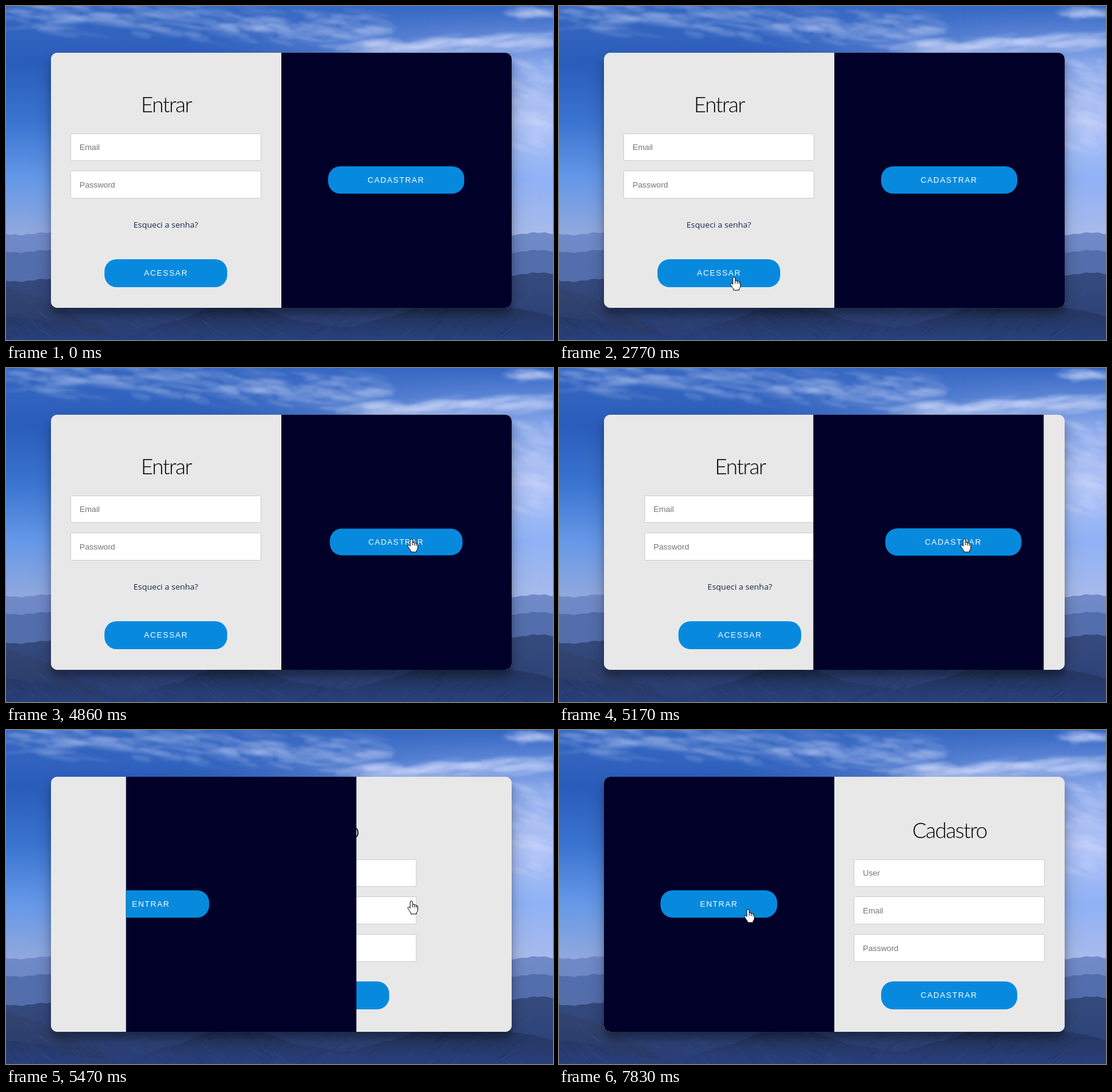
Recreate the animation shown at these times as an HTML page with a canvas. Size 900 by 550 pixels, loop 7.99 s.

```html
<!DOCTYPE html>
<html lang="pt">
<head>
<meta charset="utf-8">
<title>Entrar</title>
<style>
  html, body { margin: 0; width: 100%; height: 100%; overflow: hidden; background: #2a5cba; }
  canvas { display: block; }
</style>
</head>
<body>
<canvas id="stage" width="900" height="550"></canvas>
<script>
const W = 900, H = 550, LOOP = 7990;
const CARD = { x: 74, y: 77, w: 758, h: 420, r: 10 };
const HALF = CARD.w / 2, LEFT = CARD.x + HALF / 2;
const GREY = '#e8e8e8', NAVY = '#010028', BLUE = '#078ade';
const ARIAL = '"Liberation Sans", Arial, sans-serif';
const PRESS = 4807, SLIDE = 5042, SLIDE_MS = 600;
const ctx = document.getElementById('stage').getContext('2d');

const clamp = v => Math.max(0, Math.min(1, v));
const smooth = k => k * k * (3 - 2 * k);
const mix = (a, b, k) => a + (b - a) * k;

// CSS cubic-bezier(x1, 0, x2, 1)
function bezier(x1, x2, k) {
  let lo = 0, hi = 1;
  for (let i = 0; i < 24; i++) {
    const u = (lo + hi) / 2, v = 1 - u;
    if (3 * v * v * u * x1 + 3 * v * u * u * x2 + u * u * u < clamp(k)) lo = u; else hi = u;
  }
  return smooth(lo);
}
const easeInOut = k => bezier(.42, .58, k);
const easeIn = k => bezier(.42, 1, k);

// ---------- timeline ----------

// Pointer legs: first and last screen update, number of updates, goal x, y
const START = [695, 543];
const legs = [
  [360, 1120, 11, 224, 305], [1210, 1210, 1, 221, 298],
  [1350, 1587, 4, 205, 235], [1666, 2140, 7, 248, 344],
  [2220, 2770, 8, 288, 446], [3690, 4140, 7, 667, 281],
  [4860, 4940, 2, 667, 281], [5090, 5640, 8, 667, 281],
  [6500, 6500, 1, 620, 280], [6575, 6950, 6, 297, 295],
  [7290, 7530, 4, 428, 269], [7670, 7830, 3, 311, 295]
];

// The screen holds still between updates
function stateAt(t) {
  let [px, py] = START, state = { now: 0, x: px, y: py };
  for (const [first, last, n, gx, gy] of legs) {
    for (let i = 0; i < n; i++) {
      const now = mix(first, last, i / Math.max(1, n - 1));
      if (Math.floor(now / 10) * 10 > t) return state;
      const k = smooth((i + 1) / n);
      state = { now, x: mix(px, gx, k), y: mix(py, gy, k) };
    }
    [px, py] = [gx, gy];
  }
  return state;
}

// ---------- background ----------

let seed = 7;
function rnd() {
  seed = (seed * 16807) % 2147483647;
  return seed / 2147483647;
}
const spread = r => (rnd() + rnd() - 1) * r;

function vertical(c, y0, y1, ...colors) {
  const g = c.createLinearGradient(0, y0, 0, y1);
  colors.forEach((color, i) => g.addColorStop(i / (colors.length - 1), color));
  return g;
}

// Thin cloud wisps; place(k) gives the centre line
function wisps(c, count, place, length, alpha, tilt) {
  c.fillStyle = '#d0dbfc';
  c.filter = 'blur(2px)';
  for (let i = 0; i < count; i++) {
    const [x, y] = place(rnd());
    c.globalAlpha = alpha * (.4 + .6 * rnd());
    c.beginPath();
    c.ellipse(x, y, length * (.3 + rnd()), 1.5 + 4 * rnd(), tilt + spread(.2), 0, 7);
    c.fill();
  }
  c.filter = 'none';
  c.globalAlpha = 1;
}

function ridge(c, height, top, bottom) {
  c.beginPath();
  c.moveTo(0, H);
  for (let x = 0; x <= W; x += 3) {
    c.lineTo(x, height(x) + 2 * Math.sin(x * .07) + .7 * Math.sin(x * .31));
  }
  c.lineTo(W, H);
  c.fillStyle = vertical(c, height(0), H, top, bottom);
  c.fill();
}

function paintBackground() {
  const cv = document.createElement('canvas');
  cv.width = W;
  cv.height = H;
  const c = cv.getContext('2d');

  // blue sky on the left blends into a paler one on the right
  c.fillStyle = vertical(c, 0, 380, '#3768c2', '#2a5dbb', '#3a74d0', '#6598e8', '#93a9dd');
  c.fillRect(0, 0, W, H);
  c.fillStyle = vertical(c, 0, 380, '#3466c3', '#86a6ea', '#b0c3f6', '#8fb1f5', '#a9bbeb');
  for (let x = 0; x < W; x++) {
    c.globalAlpha = smooth(clamp((x - 250) / 600));
    c.fillRect(x, 0, 1, H);
  }
  c.globalAlpha = 1;

  wisps(c, 260, k => [k * 620, 12 + k * 30 + spread(34)], 32, .16, .1);
  wisps(c, 110, k => [mix(580, 900, k), mix(70, 56, k) + spread(16)], 45, .24, -.08);
  wisps(c, 30, () => [870 + spread(50), 12 + spread(12)], 25, .22, .1);
  wisps(c, 90, k => [870 + spread(50), mix(90, 240, k)], 22, .18, .3);

  ridge(c, () => 375, '#708ac8', '#6580bd');
  ridge(c, () => 404, '#536eae', '#566da6');
  ridge(c, x => 452 - x / 80, '#34497c', '#293e76');
  ridge(c, x => 462 + .3 * x + x * x / 1000, '#33456f', '#28396a');
  ridge(c, x => 530 - .04 * x + 20 * Math.cos((x - 180) / 60), '#263866', '#283f7a');

  // faint slopes
  c.lineWidth = 1.5;
  for (let i = 0; i < 130; i++) {
    const x = rnd() * W, y = 470 + rnd() * 85, len = 8 + rnd() * 22;
    c.strokeStyle = rnd() < .5 ? 'rgba(20,32,75,.16)' : 'rgba(95,120,180,.13)';
    c.beginPath();
    c.moveTo(x, y);
    c.lineTo(x + (x < W / 2 ? len : -len), y + len * .7);
    c.stroke();
  }

  c.fillStyle = GREY;
  for (const [dy, blur, alpha] of [[14, 28, .25], [10, 10, .22]]) {
    c.shadowColor = `rgba(0,0,0,${alpha})`;
    c.shadowOffsetY = dy;
    c.shadowBlur = blur;
    c.beginPath();
    c.roundRect(CARD.x, CARD.y, CARD.w, CARD.h, CARD.r + 2);
    c.fill();
  }
  return cv;
}

// ---------- widgets ----------

// areas of the current picture that change the pointer
let hot = [];

function box(x, y, w, h, r) {
  ctx.beginPath();
  ctx.roundRect(x, y, w, h, r);
}

function label(str, x, y, font, color, spacing = 0, align = 'left') {
  ctx.font = font;
  ctx.fillStyle = color;
  ctx.letterSpacing = spacing + 'px';
  ctx.textAlign = align;
  ctx.fillText(str, x, y);
}

const title = (str, x, y) =>
  label(str, x, y, '300 35px Lato, "Open Sans", sans-serif', '#000', -1.5, 'center');

function button(str, cx, y, w, h, scale = 1) {
  hot.push({ x: cx - w / 2, y, w, h, shape: hand });
  ctx.save();
  ctx.translate(cx, y + h / 2);
  ctx.scale(scale, scale);
  box(-w / 2, -h / 2, w, h, 20);
  ctx.fillStyle = BLUE;
  ctx.fill();
  label(str, 65 - w / 2, 27 - h / 2, '13px ' + ARIAL, '#fff', 1.5);
  ctx.restore();
}

function field(str, cx, y, h) {
  const w = 314, x = cx - w / 2 - .5;
  hot.push({ x, y, w, h, shape: beam });
  box(x + .5, y + .5, w - 1, h - 1, 2);
  ctx.fillStyle = '#fff';
  ctx.fill();
  ctx.strokeStyle = '#ccc';
  ctx.lineWidth = 1;
  ctx.stroke();
  label(str, x + 15, y + h - 18, '13.33px ' + ARIAL, '#757575');
}

function link(str, cx, y) {
  hot.push({ x: cx - 53, y: y - 14, w: 106, h: 19, shape: hand });
  label(str, cx, y, '13.5px "Open Sans", "Noto Sans", sans-serif', '#16264f', 0, 'center');
}

function signIn(cx) {
  title('Entrar', cx, 175);
  field('Email', cx, 210, 45);
  field('Password', cx, 271, 46);
  link('Esqueci a senha?', cx - .5, 365);
  button('ACESSAR', cx - .5, 417, 202, 46);
}

function signUp(cx) {
  title('Cadastro', cx, 178);
  field('User', cx, 213, 45);
  field('Email', cx, 274, 46);
  field('Password', cx, 336, 46);
  button('CADASTRAR', cx - .5, 414, 224, 46);
}

function drawCard(t) {
  const p = easeInOut((t - SLIDE) / SLIDE_MS);
  const scale = 1 - .05 * (easeIn((t - PRESS) / 80) - easeIn((t - SLIDE) / 80));
  const form = t - SLIDE < SLIDE_MS / 2 ? signIn : signUp;
  hot = [];
  ctx.save();
  box(CARD.x, CARD.y, CARD.w, CARD.h, CARD.r);
  ctx.clip();
  ctx.fillStyle = GREY;
  ctx.fillRect(CARD.x, CARD.y, CARD.w, CARD.h);
  form(LEFT + HALF * p);

  // the dark panel slides over the forms, its buttons lag behind
  ctx.beginPath();
  ctx.rect(CARD.x + HALF * (1 - p), CARD.y, HALF, CARD.h);
  ctx.clip();
  ctx.fillStyle = NAVY;
  ctx.fillRect(CARD.x, CARD.y, CARD.w, CARD.h);
  if (p > 0) button('ENTRAR', LEFT - .5 - HALF * .2 * (1 - p), 264, 192, 45);
  if (p < 1) button('CADASTRAR', LEFT - .5 + HALF * (1 + .2 * p), 264, 224, 45, scale);
  ctx.restore();
}

// ---------- pointer ----------

const arrowPath = new Path2D('M.5 .5V16.5L4.2 13L6.7 18.4L9 17.4L6.6 12.1H11.5Z');
const handPath = new Path2D('M-2 1.7Q0 -.9 2 1.7V6.3Q4.3 5.2 5.3 7Q7.4 6.1 8.3 8Q10.5 7.5 10.6 10' +
  'V15Q10.3 17.8 8.3 19.8V22H-.8V20Q-2.6 18 -4 15.6L-5.8 12.6Q-6 9.6 -3.4 10.8L-2 12.4Z');
const fingers = new Path2D('M2 6.3V11M5.3 7V11.4M8.3 8V11.8');

function outlined(path) {
  ctx.fillStyle = '#fff';
  ctx.fill(path);
  ctx.strokeStyle = '#000';
  ctx.lineWidth = 1;
  ctx.lineJoin = 'round';
  ctx.stroke(path);
}

function arrow() {
  outlined(arrowPath);
}

function hand() {
  outlined(handPath);
  ctx.stroke(fingers);
}

function beam() {
  ctx.fillStyle = '#000';
  ctx.fillRect(0, -7, 1, 14);
  for (const y of [-8, 7]) {
    ctx.fillRect(-3, y, 3, 1);
    ctx.fillRect(1, y, 3, 1);
  }
}

function drawPointer({ now, x, y }) {
  if (!now) return;
  // a resting pointer keeps its shape while the panel slides beneath it
  const resting = now >= 4140 && now < 6500;
  const area = hot.find(a => x >= a.x && x < a.x + a.w && y >= a.y && y < a.y + a.h);
  const shape = resting ? hand : area ? area.shape : arrow;
  ctx.save();
  ctx.translate(Math.floor(x), Math.floor(y));
  shape();
  ctx.restore();
}

// ---------- loop ----------

const background = paintBackground();
const begin = performance.now();

function frame() {
  const state = stateAt((performance.now() - begin) % LOOP);
  ctx.drawImage(background, 0, 0);
  drawCard(state.now);
  drawPointer(state);
  requestAnimationFrame(frame);
}
frame();
</script>
</body>
</html>
```
